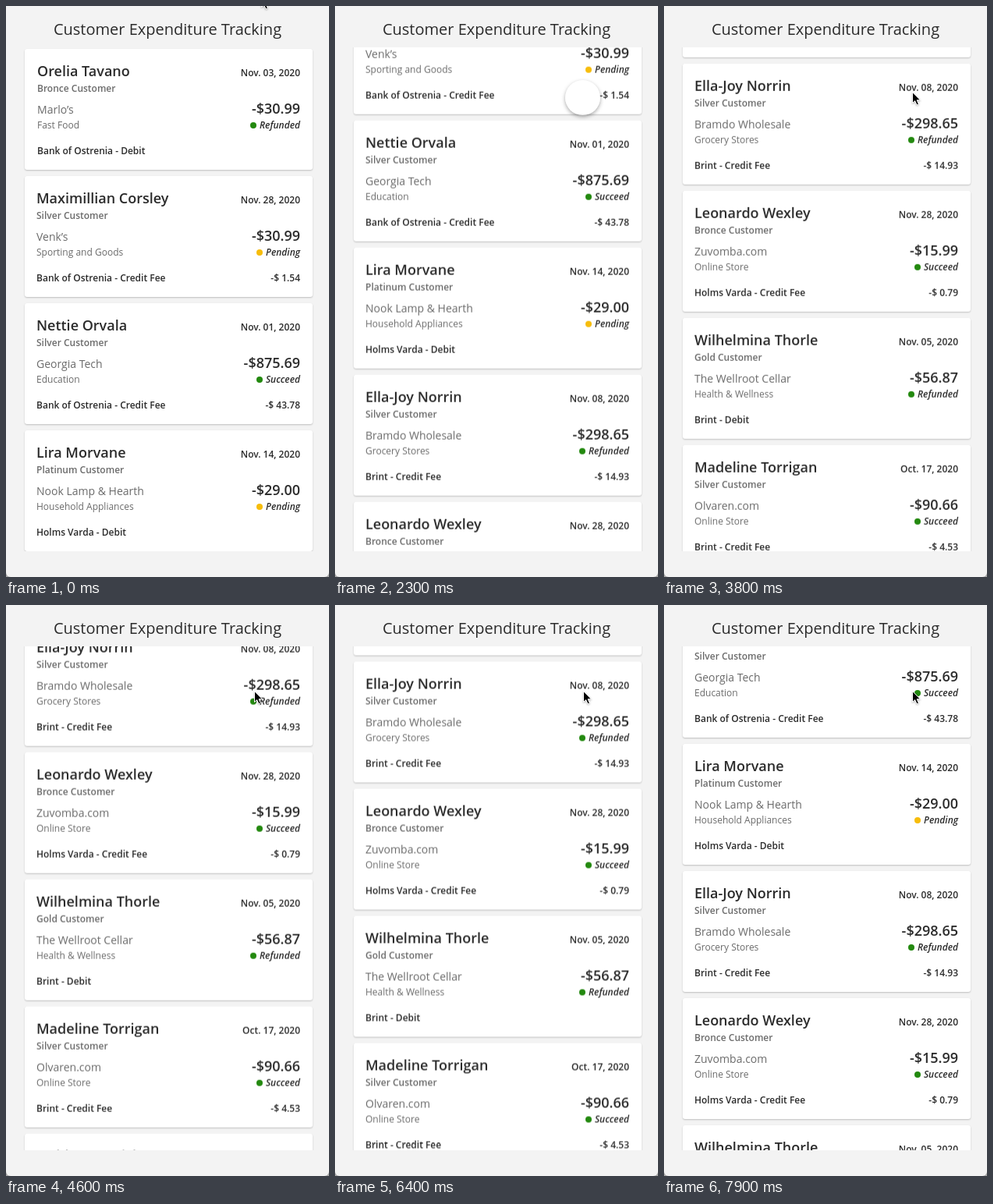
Recreate the animation shown at these times as an HTML page. Size 414 px wide and 732 px high, loop 8 s.

```html
<!DOCTYPE html>
<html lang="en">
<head>
<meta charset="utf-8">
<title>Customer Expenditure Tracking</title>
<style>
  html, body { margin: 0; width: 100%; height: 100%; overflow: hidden; background: #a6a6a6; }
  .app {
    position: relative; width: 414px; height: 732px; overflow: hidden;
    background: #f3f3f3; border-radius: 0 0 6px 6px;
    font: 12px/20px "Open Sans", sans-serif; color: #2b2b2b;
  }
  h1 { position: absolute; top: 15px; left: 0; width: 100%; margin: 0; font-size: 20px; line-height: 30px; font-weight: 400; text-align: center; }
  .view { position: absolute; left: 0; top: 53px; width: 414px; height: 646px; overflow: hidden; }
  .list { position: absolute; left: 24px; top: 2px; width: 369px; animation: scroll 8s infinite; }
  .card {
    position: relative; height: 155px; margin-bottom: 8px; background: #fff;
    border-radius: 3px; box-shadow: 0 1px 2px rgba(0, 0, 0, .22);
  }
  .card > * { position: absolute; left: 15px; white-space: nowrap; font-weight: 600; }
  .card:first-child > * { left: 16px; }
  .card .date, .card .sum, .card .state, .card .fee { left: auto; right: 16px; }
  .name, .sum { font-size: 18px; }
  .name { top: 18px; }
  .level { top: 41px; color: #6b6b6b; }
  .card .shop { top: 68px; font-size: 14px; font-weight: 400; color: #6b6b6b; }
  .card .kind { top: 88px; font-weight: 400; color: #6b6b6b; }
  .bank, .fee { top: 121px; }
  .date { top: 21px; }
  .sum { top: 66px; }
  .state { top: 88px; font-style: italic; }
  .state::before {
    content: ""; display: inline-block; width: 8px; height: 8px; margin-right: 4px;
    border-radius: 50%; background: #23890f;
  }
  .Pending::before { background: #f7bd0b; }

  .arrow, .touch { position: absolute; left: 0; top: 0; }
  .arrow { width: 16px; height: 22px; overflow: visible; filter: drop-shadow(0 1px 1px rgba(0, 0, 0, .3)); animation: move 8s infinite, arrow 8s step-end infinite; }
  .touch {
    left: 295px; top: 95px; width: 45px; height: 45px; border-radius: 50%;
    background: rgba(255, 255, 255, .55); box-shadow: 0 2px 5px rgba(0, 0, 0, .35);
    opacity: 0; animation: touch 8s step-end infinite;
  }

  @keyframes scroll {
    0%, 11.25% { transform: translateY(0); animation-timing-function: cubic-bezier(.5, .1, .7, .6); }
    17.5% { transform: translateY(-132px); animation-timing-function: cubic-bezier(.3, .5, .5, 1); }
    22.5%, 27.5% { transform: translateY(-218px); animation-timing-function: ease-in; }
    28.75% { transform: translateY(-234px); animation-timing-function: cubic-bezier(.3, .45, .5, 1); }
    38.75%, 41.25% { transform: translateY(-421px); animation-timing-function: cubic-bezier(.3, .15, .4, 1); }
    51.25%, 56.25% { transform: translateY(-668px); animation-timing-function: ease-in; }
    57.5% { transform: translateY(-681px); animation-timing-function: cubic-bezier(.3, .4, .5, 1); }
    63.75%, 73.75% { transform: translateY(-800px); animation-timing-function: cubic-bezier(.5, .1, .7, .6); }
    80% { transform: translateY(-635px); animation-timing-function: cubic-bezier(.3, .5, .5, .95); }
    85% { transform: translateY(-529px); animation-timing-function: linear; }
    87.5%, 91.25% { transform: translateY(-527px); animation-timing-function: cubic-bezier(.4, .1, .7, .8); }
    98.75%, 100% { transform: translateY(-366px); }
  }
  @keyframes move {
    0%, .5% { transform: translate(327px, -13px); animation-timing-function: ease-in; }
    5% { transform: translate(336px, 58px); animation-timing-function: ease-out; }
    8.75%, 100% { transform: translate(318px, 110px); }
  }
  @keyframes arrow {
    0%, 36.25% { opacity: 1; }
    8.75% { opacity: 0; }
  }
  @keyframes touch {
    0%, 36.25% { opacity: 0; }
    8.75% { opacity: 1; }
  }
</style>
</head>
<body>
<div class="app">
  <h1>Customer Expenditure Tracking</h1>
  <div class="view"><div class="list"></div></div>
  <div class="touch"></div>
  <svg class="arrow" viewBox="0 0 16 22">
    <path d="M.5.5V14.5L3.7 11.6 6 16.8 8.4 15.8 6.2 10.7H10.5Z" fill="#000" stroke="#fff" stroke-width="1"/>
  </svg>
</div>
<script>
  const fields = ["name", "level", "shop", "kind", "bank", "date", "sum", "state", "fee"];
  const rows = [
    "Orelia Tavano|Bronce|Marlo’s|Fast Food|Bank of Ostrenia - Debit|Nov. 03|30.99|Refunded",
    "Maximillian Corsley|Silver|Venk’s|Sporting and Goods|Bank of Ostrenia - Credit Fee|Nov. 28|30.99|Pending|1.54",
    "Nettie Orvala|Silver|Georgia Tech|Education|Bank of Ostrenia - Credit Fee|Nov. 01|875.69|Succeed|43.78",
    "Lira Morvane|Platinum|Nook Lamp & Hearth|Household Appliances|Holms Varda - Debit|Nov. 14|29.00|Pending",
    "Ella-Joy Norrin|Silver|Bramdo Wholesale|Grocery Stores|Brint - Credit Fee|Nov. 08|298.65|Refunded|14.93",
    "Leonardo Wexley|Bronce|Zuvomba.com|Online Store|Holms Varda - Credit Fee|Nov. 28|15.99|Succeed|0.79",
    "Wilhelmina Thorle|Gold|The Wellroot Cellar|Health & Wellness|Brint - Debit|Nov. 05|56.87|Refunded",
    "Madeline Torrigan|Silver|Olvaren.com|Online Store|Brint - Credit Fee|Oct. 17|90.66|Succeed|4.53",
    "Isolde Brannick|Gold|Tarn & Willow|Home Goods|Holms Varda - Debit|Nov. 11|42.50|Succeed"
  ];
  const format = {
    level: v => v + " Customer",
    date: v => v + ", 2020",
    sum: v => "-$" + v,
    fee: v => "-$ " + v
  };

  const list = document.querySelector(".list");
  for (const row of rows) {
    const card = document.createElement("div");
    card.className = "card";
    row.split("|").forEach((value, i) => {
      const field = fields[i];
      const el = document.createElement("div");
      el.className = field === "state" ? "state " + value : field;
      el.textContent = format[field] ? format[field](value) : value;
      card.append(el);
    });
    list.append(card);
  }
</script>
</body>
</html>
```
